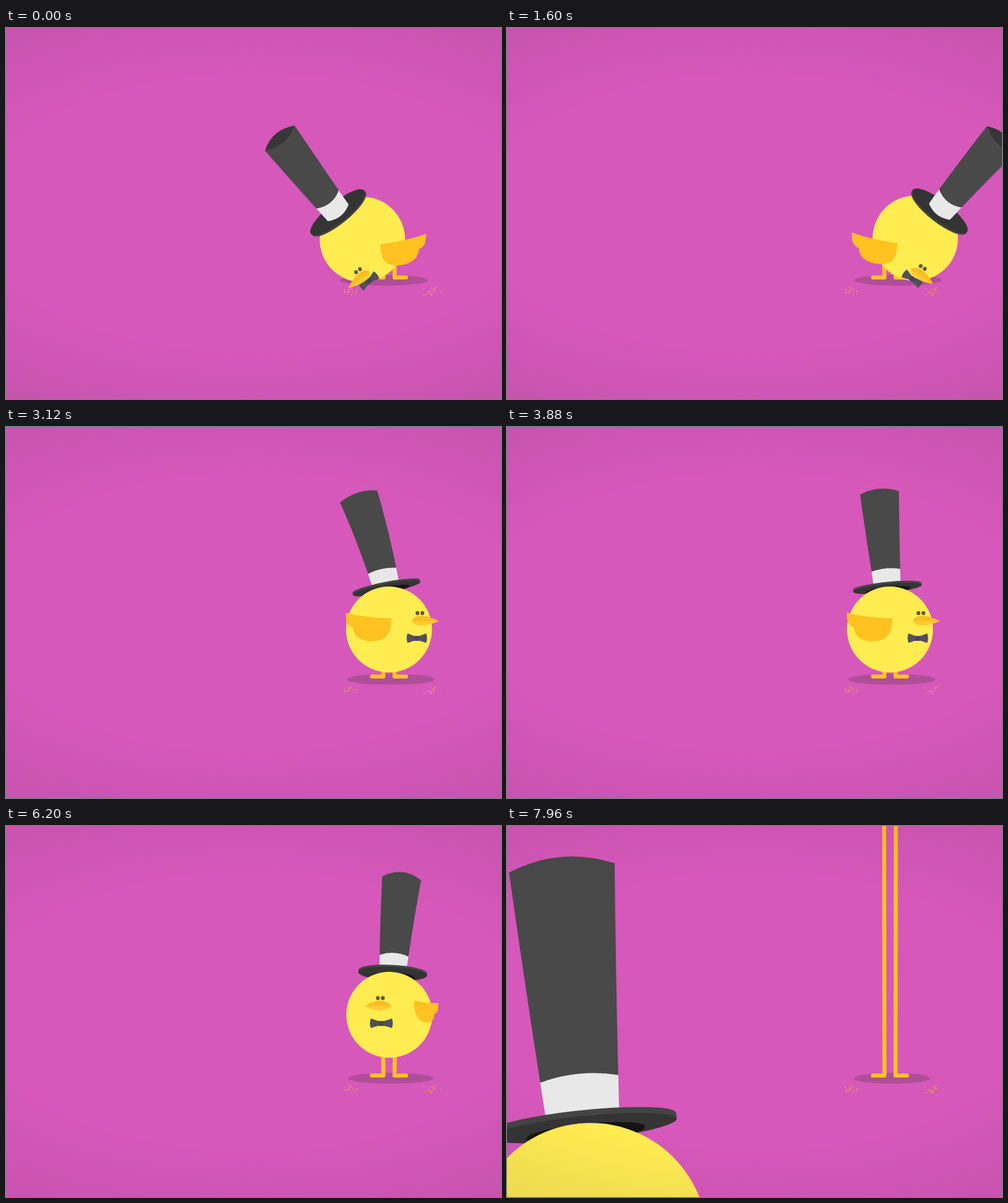
Recreate the animation shown at these times as an HTML page with a canvas. Size 800 by 600 pixels, loop 8 s.

```html
<!DOCTYPE html>
<html lang="en">
<head>
<meta charset="utf-8">
<title>Top hat chick</title>
<style>
html, body { margin: 0; height: 100%; overflow: hidden; background: #d658ba; }
canvas { display: block; }
</style>
</head>
<body>
<canvas id="stage" width="800" height="600"></canvas>
<script>
const ctx = document.getElementById('stage').getContext('2d');
const LOOP = 8000, HAT_HEIGHT = 153.5, FLOOR = 403.5, REST_Y = 327.5;
const YELLOW = '#ffec51', ORANGE = '#ffc220';
const rad = deg => deg * Math.PI / 180;
const mix = (a, b, p) => a + (b - a) * p;
const clamp = (v, lo, hi) => Math.min(hi, Math.max(lo, v));

// Body x, y, w, h; face fx, fy, turn; wing wx, wy, span, slope;
// hat hx, hy, brim angle, crown lean, tilt (positive = seen from above).
const stand = { x: 619, y: REST_Y, w: 69.5, h: 69.5, fx: 50, fy: -26.5, turn: 0,
  wx: 4, wy: -18, span: 1, slope: 0, hx: -4.2, hy: -68.2, brim: -5.8, lean: -4.8, tilt: -.13,
  droop: 0, lift: 0, closed: 0 };
const peckLeft = { ...stand, x: 576, y: 342, w: 69, h: 69, fx: -36, fy: 36, turn: -37,
  wx: 29, wy: 8, span: -1, slope: .11, hx: -39, hy: -43, brim: -39, lean: -38, tilt: .29 };
const hop = { ...stand, x: 617.5, y: 306.5, w: 68, h: 70.5, fx: 32, fy: 5.5,
  wx: -17.5, wy: 6.5, span: .82, slope: -.03, hx: -20, hy: -91, brim: -24, lean: -22.6, tilt: -.1,
  droop: -27, lift: 16, closed: 1 };
const squash = { ...stand, x: 628, y: 334, w: 74, h: 63, fx: 26, fy: 13.5, turn: 6,
  wx: -24, wy: 3, span: .8, slope: -.03, hx: 13, hy: -60, brim: 15.5, lean: 24.7, tilt: .25,
  droop: 17, closed: 1 };
const tall = { ...stand, x: 619.5, fx: -14.5, fy: -27, wx: 40, wy: -23, span: -.53, slope: -.15,
  hx: 5.5, hy: -68, brim: 3, lean: 5.4, tilt: -.2 };
const mirror = p => ({ ...p, x: 1238 - p.x, fx: -p.fx, turn: -p.turn, wx: -p.wx, span: -p.span,
  hx: -p.hx, brim: -p.brim, lean: -p.lean });
const peckRight = mirror(peckLeft);
const raisedLeft = { ...peckLeft, x: 580, y: 338, fy: 30, turn: -30, brim: -37, lean: -43 };
const raisedRight = mirror(raisedLeft);
const midTurn = { ...stand, fx: 18, fy: -27, hx: 0, brim: -1, lean: 0, tilt: -.16 };
const giant = { ...stand, fy: -18 };

const timeline = [
  [0, peckLeft], [120, raisedLeft], [240, peckLeft], [360, raisedLeft], [480, peckLeft],
  [680, mirror(squash), { lean: -20 }],
  [840, hop, { y: 280, lift: 34, hy: -76, lean: -18, droop: 10 }],
  [890, hop, { y: 245, lift: 72, hy: -86, lean: -18 }],
  [960, hop],
  [1060, squash, { x: 623, hx: -8, hy: -66, brim: -12, lean: -16, tilt: .05 }],
  [1300, peckRight], [1420, raisedRight], [1540, peckRight], [1660, raisedRight],
  [1780, peckRight], [1900, raisedRight], [2020, peckRight],
  [2360, squash],
  [2540, stand, { y: 311, h: 73, w: 68, hy: -73, brim: -15, lean: -24 }],
  [2840, stand, { y: 325, brim: 8, lean: 20, hx: 4 }],
  [3120, stand, { brim: -11, lean: -17 }],
  [3400, stand, { brim: -9, lean: -12 }],
  [3700, stand], [4240, stand],
  [4480, stand, { y: 299 }], [4760, stand], [5160, stand],
  [5360, midTurn, { wx: -45, span: .45 }],
  [5361, midTurn, { wx: 52, span: -.42, slope: -.15 }],
  [5600, tall]
].map(([time, pose, change]) => ({ time, pose: { ...pose, ...change } }));

function poseAt(t) {
  let i = timeline.length - 1;
  while (timeline[i].time > t) i--;
  const from = timeline[i], to = timeline[i + 1] || from;
  const q = to === from ? 0 : (t - from.time) / (to.time - from.time);
  const p = q * q * (3 - 2 * q), result = {};
  for (const key in stand) result[key] = mix(from.pose[key], to.pose[key], p);
  if (t > 5900) result.y -= 22 * ((t - 5900) / 300) ** 1.89;
  return result;
}

function ellipse(x, y, rx, ry, fill, angle = 0) {
  ctx.fillStyle = fill;
  ctx.beginPath();
  ctx.ellipse(x, y, rx, ry, angle, 0, 7);
  ctx.fill();
}

function drawLegs(b) {
  ctx.strokeStyle = ORANGE;
  ctx.lineWidth = 6.5;
  ctx.lineCap = ctx.lineJoin = 'round';
  const ankle = FLOOR - b.lift, toe = ankle - Math.min(b.lift, 16) * .65;
  for (const side of [-1, 1]) {
    ctx.beginPath();
    ctx.moveTo(619 + side * 10, b.y);
    ctx.lineTo(619 + side * 9, ankle);
    ctx.lineTo(619 + side * 27.5, toe);
    ctx.stroke();
  }
}

function drawCrown(b) {
  const c = rad(b.lean), a = mix(rad(b.brim), c, .5);
  // Point at height h on the bent crown, u across and v downwards.
  const at = (h, u, v = 0) => {
    const turn = mix(rad(b.brim), c * 1.06, h);
    const low = h * (1 - h) * HAT_HEIGHT, high = h * h * HAT_HEIGHT;
    return [low * Math.sin(a) + high * Math.sin(c) + u * Math.cos(turn) - v * Math.sin(turn),
      -low * Math.cos(a) - high * Math.cos(c) + u * Math.sin(turn) + v * Math.cos(turn)];
  };
  const halfWidth = h => 21.5 + 10 * h;
  const topTilt = b.tilt * (b.tilt < 0 ? 1.6 : 1.05);
  const slab = (h0, h1, tilt0, tilt1, fill) => {
    const w0 = halfWidth(h0), w1 = halfWidth(h1), steps = 10;
    ctx.beginPath();
    for (let i = 0; i <= steps; i++) {
      const h = mix(h0, h1, i / steps);
      ctx.lineTo(...at(h, -halfWidth(h)));
    }
    ctx.quadraticCurveTo(...at(h1, 0, 2 * w1 * tilt1), ...at(h1, w1));
    for (let i = steps; i >= 0; i--) {
      const h = mix(h0, h1, i / steps);
      ctx.lineTo(...at(h, halfWidth(h)));
    }
    ctx.quadraticCurveTo(...at(h0, 0, 2 * w0 * tilt0), ...at(h0, -w0));
    ctx.fillStyle = fill;
    ctx.fill();
  };
  slab(0, .185, b.tilt, b.tilt, '#e8e8e8');
  slab(.18, 1, b.tilt, topTilt, '#494949');
  if (b.tilt > 0) slab(1, 1, topTilt, -topTilt, '#373737');
}

function drawBrim(b) {
  const below = b.tilt < 0, ry = 55 * Math.abs(b.tilt), edge = below ? -1.75 : 1.5;
  ctx.save();
  ctx.rotate(rad(b.brim));
  ellipse(0, edge, 55.5, ry, '#444');
  ctx.fillRect(-55.5, -Math.abs(edge), 111, 2 * Math.abs(edge));
  ellipse(0, -edge, 55.5, ry, '#343434');
  if (below) ellipse(1, -b.tilt * 35, 35.5, -b.tilt * 40, '#141414');
  ctx.restore();
}

function drawHat(b) {
  ctx.save();
  ctx.translate(b.hx, b.hy);
  const parts = [drawCrown, drawBrim];
  if (b.tilt > 0) parts.reverse();
  parts.forEach(draw => draw(b));
  ctx.restore();
}

function drawWing(b) {
  ctx.save();
  ctx.transform(b.span, b.slope, 0, .6 + .4 * Math.abs(b.span), b.wx, b.wy);
  ctx.fillStyle = ORANGE;
  ctx.beginPath();
  ctx.moveTo(0, 0);
  ctx.quadraticCurveTo(-45, -1.5, -74, -9);
  ctx.lineTo(-73, 3);
  ctx.quadraticCurveTo(-71, 12, -62, 15);
  ctx.bezierCurveTo(-62, 30, -48, 37, -32, 37);
  ctx.bezierCurveTo(-8, 37, 0, 24, 0, 0);
  ctx.fill();
  ctx.restore();
}

function drawBow(x, y, width, droop) {
  ctx.save();
  ctx.translate(x, y);
  ctx.fillStyle = '#534f5c';
  for (const side of [-1, 1]) {
    ctx.save();
    ctx.scale(side, 1);
    ctx.rotate(rad(droop));
    ctx.beginPath();
    ctx.moveTo(2, -3);
    ctx.lineTo(width - 2, -8);
    ctx.quadraticCurveTo(width + 1, 0, width - 2, 7.5);
    ctx.lineTo(2, 3);
    ctx.fill();
    ctx.restore();
  }
  ctx.fillStyle = '#4a4654';
  ctx.fillRect(-4.5, -4, 9, 8);
  ctx.restore();
}

function drawBeak(x, y, yaw) {
  const half = (height, fill) => {
    ctx.fillStyle = fill;
    ctx.beginPath();
    ctx.moveTo(x - 21.5, y);
    ctx.bezierCurveTo(x - 10 - 10 * yaw, y + height, x + 10 - 10 * yaw, y + height, x + 21.5, y);
    ctx.fill();
  };
  half(9.5, '#ffcb33');
  half(-11.5, '#fabd22');
}

function drawFace(b) {
  const yaw = clamp(b.fx / 45, -1, 1);
  ctx.save();
  ctx.rotate(rad(b.turn));
  ctx.translate(b.fx, b.fy);
  drawBow(-5 * yaw, 41 - .27 * (b.fy + 27) - .12 * b.droop, 20 - 3 * Math.abs(yaw), b.droop);
  drawBeak(9 * yaw, 13, yaw);
  for (const x of [-4, 4]) {
    if (b.closed > .5) {
      ctx.fillStyle = '#6a6038';
      ctx.fillRect(x - 2.5, -.5, 5, 1);
    } else ellipse(x, 0, 3.1, 3.3, '#625a38');
  }
  ctx.restore();
}

function drawBird(b, x, y, scale) {
  ctx.save();
  ctx.translate(x, y);
  ctx.scale(scale, scale);
  if (b.tilt <= 0) drawHat(b);
  ellipse(0, 0, b.w, b.h, YELLOW, rad(b.brim));
  if (b.tilt > 0) drawHat(b);
  drawFace(b);
  drawWing(b);
  ctx.restore();
}

function drawShadow(b) {
  const rise = Math.max(0, REST_Y - b.y);
  const rx = 71 - 9 * (1 - Math.exp(-rise / 90)) - .2 * b.lift;
  ellipse(622 + b.turn * .3, 408, rx, 8.7, '#af4e99');
}

function drawCrumbs() {
  let seed = 11;
  const random = () => (seed = seed * 16807 % 2147483647) / 2147483647;
  for (const [x, slant] of [[554, .1], [688, -.15]]) {
    for (let i = 0; i < 24; i++) {
      const dx = (random() + random() - 1) * 14, dy = (random() - .5) * 12;
      ctx.fillStyle = i % 3 ? '#f09a62' : '#f2b84e';
      ctx.fillRect(x + dx, 425 + dy + dx * slant, 1.4, 1.2);
    }
  }
}

function drawVignette() {
  ctx.save();
  ctx.translate(400, 300);
  ctx.scale(2, 1);
  const shade = ctx.createRadialGradient(0, 0, 220, 0, 0, 370);
  shade.addColorStop(0, 'rgba(60,40,70,0)');
  shade.addColorStop(1, 'rgba(60,40,70,.1)');
  ctx.fillStyle = shade;
  ctx.fillRect(-200, -300, 400, 600);
  ctx.restore();
}

function drawScene(t) {
  const bird = poseAt(t);
  ctx.fillStyle = '#d658ba';
  ctx.fillRect(0, 0, 800, 600);
  drawShadow(bird);
  drawCrumbs();
  drawLegs(bird);
  drawBird(bird, bird.x, bird.y, 1);
  const p = (t - 7480) / 480;
  if (p > 0) drawBird(giant, 135, 1235 - 565 * p * (1.4 - .4 * p), 2.72);
  drawVignette();
}

function tick() {
  drawScene(performance.now() % LOOP);
  requestAnimationFrame(tick);
}
tick();
</script>
</body>
</html>
```
